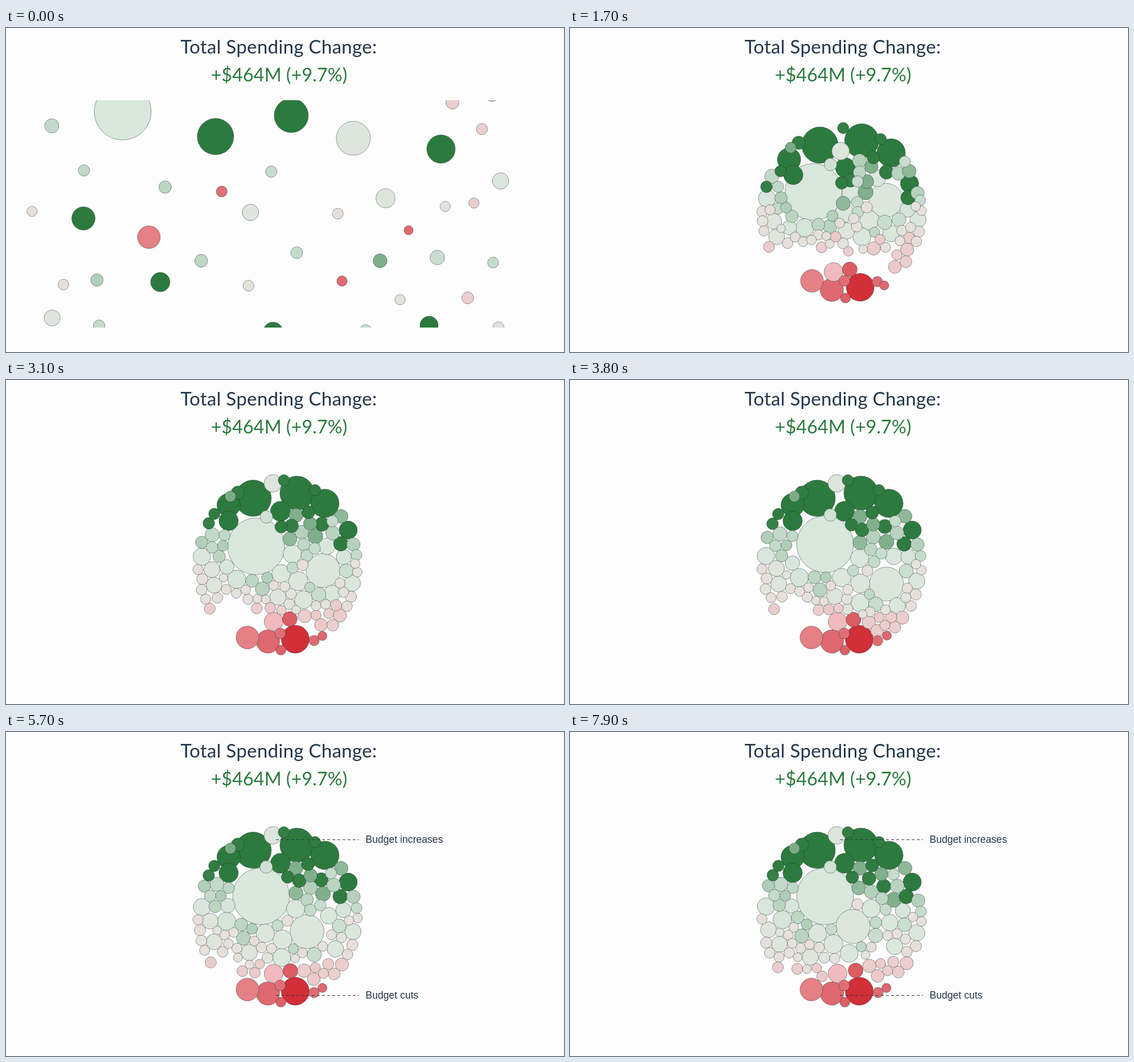
Write an HTML page with a canvas that moves like this. It is 980 px wide and 570 px high and loops after 8000 ms.

```html
<!DOCTYPE html>
<html lang="en">
<head>
<meta charset="utf-8">
<title>Total Spending Change</title>
<style>
html, body { margin: 0; width: 980px; height: 570px; overflow: hidden; background: #fdfdfd; }
canvas, svg { position: absolute; left: 0; top: 0; display: block; }
.head { font: 33px Lato, "Open Sans", sans-serif; text-anchor: middle; }
#labels { font: 17.6px "Liberation Sans", Arial, sans-serif; fill: #24364a; }
#labels path { stroke: #24364a; stroke-dasharray: 5 4; }
</style>
</head>
<body>
<canvas id="stage" width="980" height="570"></canvas>
<svg width="980" height="570">
  <text class="head" x="479" y="45" fill="#24364a" letter-spacing=".3">Total Spending Change:</text>
  <text class="head" x="479.5" y="93.5" fill="#2d7a3e" style="font-size:32.4px">+$464M (+9.7%)</text>
  <g id="labels">
    <path d="M474 189.5H620M474 463.5H620"/>
    <text x="631.5" y="195">Budget increases</text>
    <text x="631.5" y="469">Budget cuts</text>
  </g>
</svg>
<script>
const FRAMES = 80, STEP = 100, GATHERED = 9, SORTED = 25;
const KNOTS = [0, GATHERED, SORTED, 38, 79];
const CX = 477, CY = 325, RX = 149, RY = 159;

const ctx = document.getElementById('stage').getContext('2d');
const labels = document.getElementById('labels');
const bubbles = [];

let seed = 11;
const rand = () => (seed = seed * 16807 % 2147483647) / 2147483647;
const between = (a, b) => a + (b - a) * rand();
const mix = (a, b, u) => a + (b - a) * u;
const easeOut = u => 1 - (1 - u) ** 2.4;

// Red for cuts, grey for no change, green for increases
const SCALE = [[-1, 210, 47, 56], [-0.4, 240, 186, 190], [0, 230, 226, 221], [0.1, 216, 231, 221], [1, 45, 122, 62]];
function colour(change) {
  let i = 0;
  while (i < SCALE.length - 2 && change > SCALE[i + 1][0]) i++;
  const [a, b] = [SCALE[i], SCALE[i + 1]], u = (change - a[0]) / (b[0] - a[0]);
  return `rgb(${[1, 2, 3].map(c => Math.round(mix(a[c], b[c], u)))})`;
}

// Height at which a bubble floats
const level = change => 340 - 170 * Math.tanh(2 * change);

// A leading bubble, guided through key points
function lead(r, change, ...path) {
  bubbles.push({ r, change, path, weight: 0, x: path[0], y: path[1], track: [] });
}

// Picks the emptiest of several random places
function openSpot(r) {
  let best, room = -Infinity;
  for (let n = 0; n < 14; n++) {
    const x = between(45, 880), y = between(-250, 900);
    const free = Math.min(...bubbles.map(b => Math.hypot(x - b.x, y - b.y) - b.r - r));
    if (free > room) { room = free; best = [x, y]; }
  }
  return best;
}

function crowd(count, rMin, rMax, changeMin, changeMax) {
  for (let i = 0; i < count; i++) {
    const r = between(rMin, rMax), [x, y] = openSpot(r);
    bubbles.push({ r, change: between(changeMin, changeMax), weight: 1 / (r * r), x, y, sx: x, sy: y, track: [] });
  }
}

lead(50, 0.09, 205,147, 409,256, 432,296, 448,289);
lead(30, 0.07, 610,194, 540,252, 558,315, 556,359, 497,342);
lead(32, 1, 368,191, 460,198, 434,208);
lead(30, 1, 501,154, 518,196, 511,199);
lead(25, 1, 764,213, 581,232, 560,217);
lead(20.5, 1, 136,335, 358,280, 391,220);
lead(17, 1, 271,447, 397,303, 391,248);
lead(17.5, 1, 469,535, 490,309, 482,231);
lead(16, 1, 743,523, 576,315, 601,264);
lead(20, -0.65, 251,368, 429,410, 424,453);
lead(20.5, -0.75, 400,640, 459,463, 460,460);
lead(24.5, -1, 560,650, 517,457, 508,456);
lead(16.5, -0.4, 350,600, 432,447, 470,425);

crowd(10, 10, 13, 0.95, 1);
crowd(6, 9, 14, 0.45, 0.6);
crowd(15, 12.5, 18, 0.02, 0.12);
crowd(22, 8.5, 13, 0.15, 0.32);
crowd(26, 7.5, 10, -0.04, 0.03);
crowd(11, 7.5, 12, -0.26, -0.18);
crowd(5, 8, 13.5, -0.85, -0.6);

const leads = bubbles.filter(b => b.path), free = bubbles.filter(b => !b.path);

function follow(b, k) {
  const last = b.path.length / 2 - 1;
  let i = 0;
  while (i < last - 1 && k >= KNOTS[i + 1]) i++;
  const u = Math.min(1, (k - KNOTS[i]) / (KNOTS[i + 1] - KNOTS[i]));
  const e = i < 2 ? easeOut(u) : u, j = 2 * i;
  b.x = mix(b.path[j], b.path[j + 2], e);
  b.y = mix(b.path[j + 1], b.path[j + 3], e);
}

function separate(a, b) {
  const total = a.weight + b.weight;
  if (!total) return;
  const dx = a.x - b.x, dy = a.y - b.y, d = Math.hypot(dx, dy) || 1;
  const gap = a.r + b.r - 0.5 - d;
  if (gap <= 0) return;
  const s = 0.7 * gap / d / total;
  a.x += dx * s * a.weight;
  a.y += dy * s * a.weight;
  b.x -= dx * s * b.weight;
  b.y -= dy * s * b.weight;
}

// Keeps a bubble inside the round cluster
function contain(b) {
  const over = Math.hypot((b.x - CX) / (RX - b.r), (b.y - CY) / (RY - b.r));
  if (over <= 1) return;
  b.x = CX + (b.x - CX) / over;
  b.y = CY + (b.y - CY) / over;
}

function relax(passes) {
  while (passes--) {
    for (let i = 0; i < bubbles.length; i++)
      for (let j = 0; j < i; j++) separate(bubbles[i], bubbles[j]);
    free.forEach(contain);
  }
}

// Map the scattered field onto the disc to find where each bubble gathers
leads.forEach(b => follow(b, GATHERED));
for (const b of free) {
  const u = (b.sx - 462) / 418, w = (b.sy - CY) / 575;
  b.x = CX + 140 * u * Math.sqrt(1 - w * w / 2);
  b.y = mix(CY + 150 * w * Math.sqrt(1 - u * u / 2), level(b.change), 0.45);
}
relax(40);
for (const b of free) [b.gx, b.gy] = [b.x, b.y];

for (let k = 0; k < FRAMES; k++) {
  leads.forEach(b => follow(b, k));
  if (k <= GATHERED) {
    const e = easeOut(k / GATHERED);
    for (const b of free) [b.x, b.y] = [mix(b.sx, b.gx, e), mix(b.sy, b.gy, e)];
  } else {
    const sorting = k < SORTED;
    for (const b of free) b.y += (level(b.change) - b.y) * (sorting ? 0.14 : 0.03);
    relax(sorting ? 4 : 14);
  }
  for (const b of bubbles) b.track.push([b.x, b.y]);
}
bubbles.sort((a, b) => b.r - a.r);

function draw() {
  const k = Math.floor(performance.now() % (FRAMES * STEP) / STEP);
  ctx.clearRect(0, 0, 980, 570);
  ctx.save();
  ctx.beginPath();
  ctx.rect(0, 127, 980, 400);
  ctx.clip();
  ctx.strokeStyle = 'rgba(30,45,45,.45)';
  for (const b of bubbles) {
    ctx.beginPath();
    ctx.arc(...b.track[k], b.r, 0, 2 * Math.PI);
    ctx.fillStyle = colour(b.change);
    ctx.fill();
    ctx.stroke();
  }
  ctx.restore();
  labels.style.opacity = Math.min(1, Math.max(0, (k - 50) / 6));
  requestAnimationFrame(draw);
}
draw();
</script>
</body>
</html>
```
